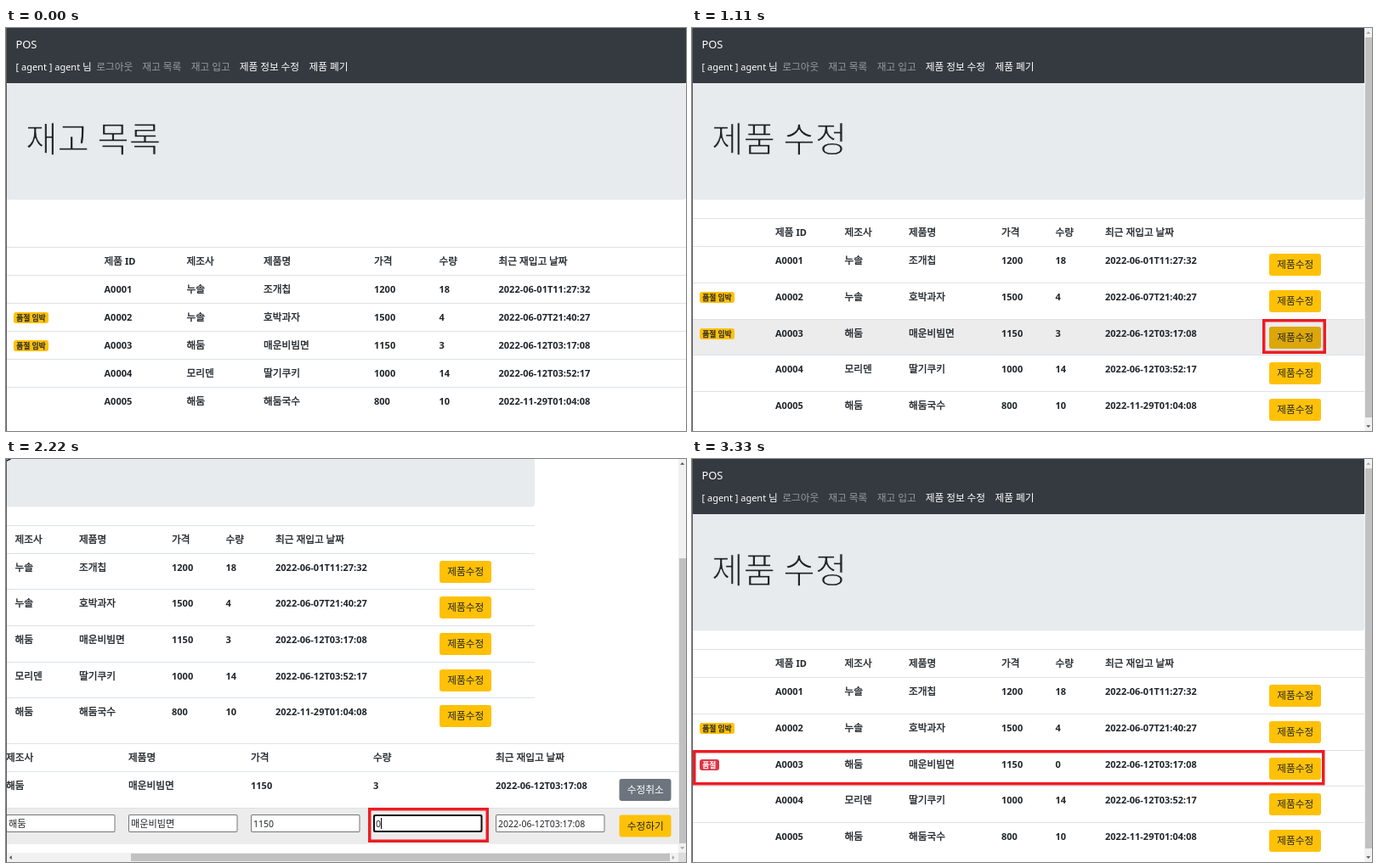
These frames come from a looping animation (800x475 px, 3700 ms). An HTML page with a canvas:

```html
<!DOCTYPE html>
<html lang="ko">
<head>
<meta charset="utf-8">
<title>POS</title>
<style>
html, body { margin: 0; width: 100%; height: 100%; overflow: hidden; background: #fff; }
canvas { display: block; }
</style>
</head>
<body>
<canvas id="stage" width="800" height="475"></canvas>
<script>
const ctx = document.getElementById('stage').getContext('2d');
const W = 800, H = 475, STEP = 370, BAR = 9;
const FONT = '"Noto Sans", "Noto Sans CJK KR", "Noto Sans CJK", sans-serif';
const KFONT = '"Noto Sans CJK KR", "Noto Sans CJK", "Noto Sans", sans-serif';
const INK = '#212529', LINE = '#dee2e6', RED = '#ed1c24', PANEL = '#e7ebee';
const YELLOW = '#ffc107', YELLOW_HOVER = '#dca70a', HOVER = '#ececec';

const HEAD = ['제품 ID', '제조사', '제품명', '가격', '수량', '최근 재입고 날짜'];
const ITEMS = [
  ['A0001', '누솔', '조개칩', '1200', '18', '2022-06-01T11:27:32'],
  ['A0002', '누솔', '호박과자', '1500', '4', '2022-06-07T21:40:27'],
  ['A0003', '해둠', '매운비빔면', '1150', '3', '2022-06-12T03:17:08'],
  ['A0004', '모리덴', '딸기쿠키', '1000', '14', '2022-06-12T03:52:17'],
  ['A0005', '해둠', '해둠국수', '800', '10', '2022-11-29T01:04:08']
];
const LIST_X = [115.5, 212.5, 303, 433, 509.5, 579.5];
const EDIT_X = [98, 179.5, 255, 364, 427.5, 486];
const FORM_X = HEAD.map((_, i) => 25 + 144 * i);
const SCROLL_X = 169, SCROLL_Y = 146;

// One entry per step of the demo
const SCENES = [
  { page: 'list' },
  { page: 'list', mark: [270, 35, 80, 22] },
  { page: 'edit' },
  { page: 'edit', hover: 2, mark: [671, 343, 75, 41] },
  { page: 'form', sx: 0 },
  { page: 'form', sx: SCROLL_X },
  { page: 'form', sx: SCROLL_X, typed: true, mark: [426, 411, 142, 41] },
  { page: 'form', sx: SCROLL_X, typed: true, save: true, mark: [715.5, 415, 72.5, 35] },
  { page: 'edit', sold: true },
  { page: 'edit', sold: true, mark: [1, 343, 743.5, 41.5] }
];

function rect(x, y, w, h, color) {
  ctx.fillStyle = color;
  ctx.fillRect(x, y, w, h);
}

function round(x, y, w, h, r, color) {
  ctx.fillStyle = color;
  ctx.beginPath();
  ctx.roundRect(x, y, w, h, r);
  ctx.fill();
}

function outline(str, x, y, width, color) {
  ctx.strokeStyle = color;
  ctx.lineWidth = width;
  ctx.lineJoin = 'round';
  ctx.strokeText(str, x, y);
}

// Hangul runs are slightly larger than Latin ones; bold Hangul is a thickened regular
function text(str, x, y, size = 11, weight = 700, color = INK) {
  for (const run of str.split(/([가-힣]+)/)) {
    if (!run) continue;
    const hangul = /[가-힣]/.test(run);
    ctx.font = hangul ? `400 ${size * 1.065}px ${KFONT}` : `${weight} ${size}px ${FONT}`;
    ctx.fillStyle = color;
    ctx.fillText(run, x, y);
    if (hangul && weight > 400) outline(run, x, y, 0.35, color);
    x += ctx.measureText(run).width;
  }
}

// Large thin heading: the panel colour trims the edges of the strokes
function heading(str, x, y) {
  ctx.font = `300 40.8px ${KFONT}`;
  ctx.fillStyle = INK;
  ctx.fillText(str, x, y);
  outline(str, x, y, 1.1, PANEL);
}

function cells(row, xs, y) {
  row.forEach((s, i) => text(s, xs[i], y));
}

function badge(y, sold) {
  round(9, y, sold ? 23 : 41, 13, 3, sold ? '#dc3545' : YELLOW);
  text(sold ? '품절' : '품절 임박', 12.2, y + 9.7, 8.25, 700, sold ? '#fff' : INK);
}

function button(label, x, y, bg = YELLOW, color = INK) {
  round(x, y, 61, 26, 3, bg);
  text(label, x + 9.2, y + 17, 11, 400, color);
}

function frame([x, y, w, h]) {
  ctx.strokeStyle = RED;
  ctx.lineWidth = 3.5;
  ctx.lineJoin = 'miter';
  ctx.strokeRect(x + 1.75, y + 1.75, w - 3.5, h - 3.5);
}

function header(title, w) {
  rect(0, 0, w, 65, '#343a40');
  text('POS', 11.5, 24, 12.9, 400, '#fff');
  const nav = [['[ agent ] agent 님', 11.5], ['로그아웃', 106.2], ['재고 목록', 160.3],
    ['재고 입고', 217.8], ['제품 정보 수정', 274.8], ['제품 폐기', 356.5]];
  nav.forEach(([s, x], i) =>
    text(s, x, 50, 11, 400, i > 0 && i < 4 ? '#999c9f' : '#fff'));
  round(0, 65, w, 137.5, 4, PANEL);
  heading(title, 23, 146);
}

function listPage() {
  header('재고 목록', W);
  [HEAD, ...ITEMS].forEach((row, i) => {
    const y = 258 + 33 * i;
    rect(0, y, W, 1, LINE);
    cells(row, LIST_X, y + 21);
    if (i === 2 || i === 3) badge(y + 11);
  });
}

function editPage(scene) {
  const w = W - BAR;
  // the scrolled view sits half a pixel lower, which shifts the row snapping
  const top = scene.page === 'form' ? 256.8 : 257.3;
  header('제품 수정', w);
  rect(0, 224, w, 1, LINE);
  cells(HEAD, EDIT_X, 245);
  ITEMS.forEach((item, i) => {
    const y = Math.round(top + 42.6 * i), hot = scene.hover === i;
    const sold = scene.sold && i === 2;
    if (hot) rect(0, y, w, 43, HOVER);
    rect(0, y, w, 1, LINE);
    cells(sold ? item.with(4, '0') : item, EDIT_X, y + 21);
    if (i === 1 || i === 2) badge(y + 11, sold);
    button('제품수정', 679, y + 9, hot ? YELLOW_HOVER : YELLOW);
  });
}

function input(value, x, y, focus) {
  const b = focus ? 2 : 1, w = 128.5, h = 21;
  round(x, y, w, h, 2, focus ? '#101010' : '#767676');
  round(x + b, y + b, w - 2 * b, h - 2 * b, 1, '#fff');
  text(value, x + 3, y + 14.8, 10.5, 400);
  if (focus) rect(x + 9, y + 4, 1, 13, '#000');
}

function formTable(scene) {
  const w = 960, item = ITEMS[2], x = 721.5 + SCROLL_X;
  if (scene.typed) rect(0, 557, w, 43, HOVER);
  for (const y of [481, 514, 557]) rect(0, y, w, 1, LINE);
  cells(HEAD, FORM_X, 502);
  cells(item, FORM_X, 535);
  item.forEach((s, i) => {
    const focus = scene.typed && i === 4;
    input(focus ? '0' : s, FORM_X[i], 565, focus);
  });
  button('수정취소', x, 523, '#6c757d', '#fff');
  button('수정하기', x, 565.5, scene.save ? YELLOW_HOVER : YELLOW);
}

// Small triangle pointing along (dx, dy)
function arrow(x, y, dx, dy, color) {
  ctx.fillStyle = color;
  ctx.beginPath();
  ctx.moveTo(x + dx * 1.5, y + dy * 1.5);
  ctx.lineTo(x - dx * 1.2 + dy * 2.5, y - dy * 1.2 + dx * 2.5);
  ctx.lineTo(x - dx * 1.2 - dy * 2.5, y - dy * 1.2 - dx * 2.5);
  ctx.fill();
}

function scrollbars(scene) {
  const form = scene.page === 'form', end = form ? 464 : H, x = W - BAR;
  const on = '#505050', off = '#a3a3a3';
  rect(x, 0, BAR, H, '#f1f1f1');
  if (form) rect(792, 117, 8, 336, '#c1c1c1');
  else rect(792, 11, 8, 448, '#c1c1c1');
  arrow(795.7, 5.5, 0, -1, form ? on : off);
  arrow(795.7, end - 5.5, 0, 1, form ? off : on);
  if (!form) return;
  rect(0, 464, W, 11, '#f1f1f1');
  rect(x, 464, BAR, 11, '#dcdcdc');
  rect(scene.sx ? 147 : 11, 465, 634, 9, '#c1c1c1');
  arrow(5.5, 469.7, -1, 0, scene.sx ? on : off);
  arrow(785, 469.7, 1, 0, scene.sx ? off : on);
}

function draw(scene) {
  rect(0, 0, W, H, '#fff');
  if (scene.page === 'list') {
    listPage();
  } else {
    ctx.save();
    if (scene.page === 'form') ctx.translate(-scene.sx, -SCROLL_Y);
    editPage(scene);
    if (scene.page === 'form') formTable(scene);
    ctx.restore();
    scrollbars(scene);
  }
  rect(0, 0, 1, H, '#5c5f62');
  if (scene.mark) frame(scene.mark);
}

function tick() {
  const step = Math.floor(performance.now() / STEP) % SCENES.length;
  draw(SCENES[step]);
  requestAnimationFrame(tick);
}
tick();
</script>
</body>
</html>
```
